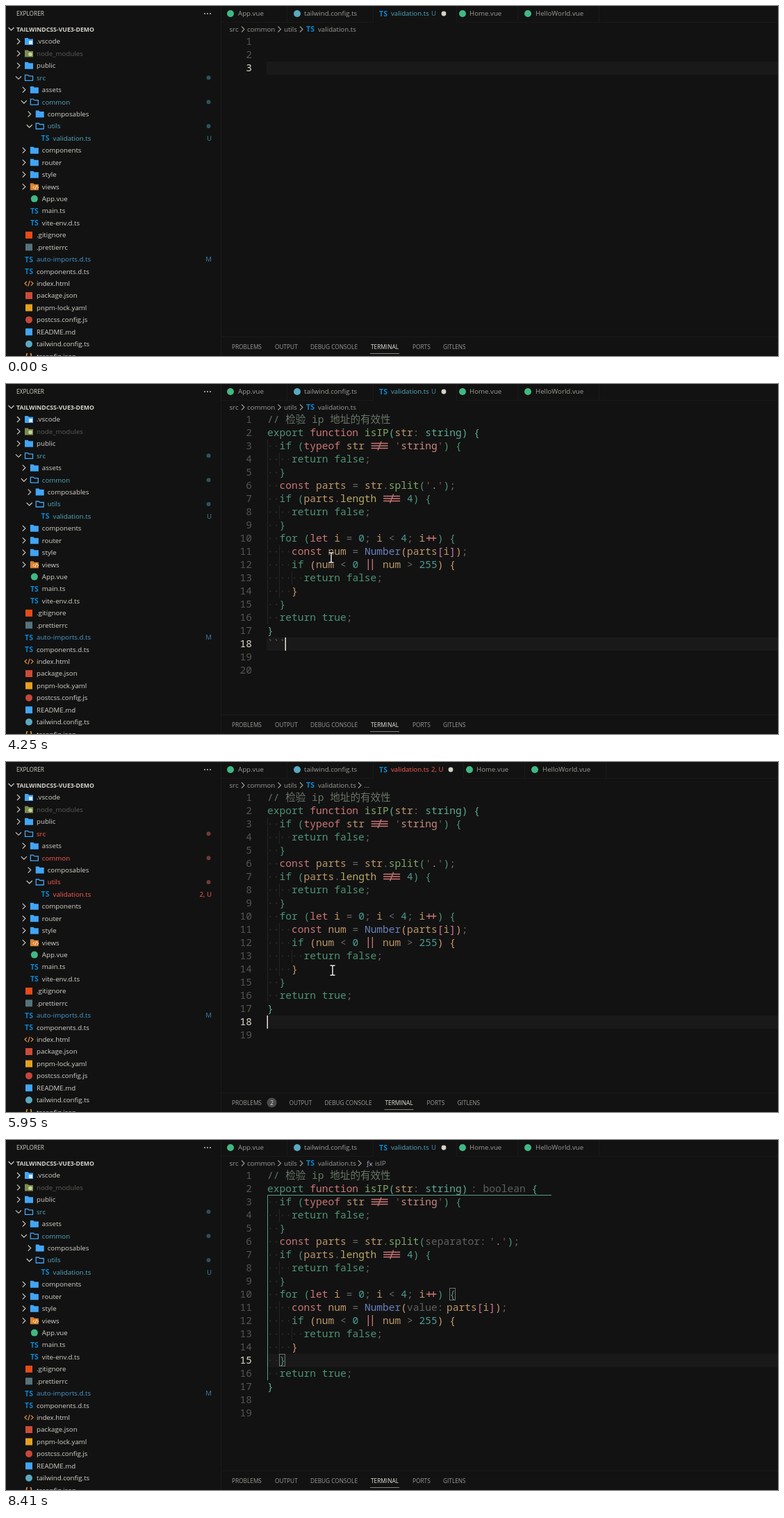
Recreate the animation shown at these times as an HTML page with a canvas. Size 1111x504 px, loop 8720 ms.

```html
<!DOCTYPE html>
<html lang="en">
<head>
<meta charset="utf-8">
<title>Code completion in an editor</title>
<style>
  html, body { margin: 0; width: 100%; height: 100%; overflow: hidden; background: #121212; }
  canvas { display: block; }
</style>
</head>
<body>
<canvas id="stage" width="1111" height="504"></canvas>
<script>
const ctx = document.getElementById('stage').getContext('2d');
const LOOP = 8720, CELL = 8.743, LEFT = 376, TOP = 42, LINE = 19;
const UI = '9.7px "Open Sans", sans-serif';
const SMALL = '8.3px "Open Sans", sans-serif';
const BOLD = 'bold 8.7px "Open Sans", sans-serif';
const BADGE = 'bold 10.5px "Open Sans", sans-serif';
const MONO = '14.57px "Noto Sans Mono", "Noto Sans CJK SC", "DejaVu Sans Mono", monospace';
const FG = '#d4d2ca', DIM = '#9b9b97', EDGE = '#1a1a1a';
const TEAL = '#52a9bd', BLUE = '#4798cc', RED = '#ff5a50', FOLDER = '#42a5f5', TS = '#0b86d0';
const VUE = 'o#41b883', WIND = 'o#5aa9c2';

const code = `// 检验 ip 地址的有效性
export function isIP(str: string) {
  if (typeof str !== 'string') {
    return false;
  }
  const parts = str.split('.');
  if (parts.length !== 4) {
    return false;
  }
  for (let i = 0; i < 4; i++) {
    const num = Number(parts[i]);
    if (num < 0 || num > 255) {
      return false;
    }
  }
  return true;
}
\`\`\``.split('\n');

const syntax = [
  [/\/\/.*/y, '#667566'],
  [/(?<=')[^']+(?=')/y, '#c98a7d'],
  [/'|`+/y, '#85594f'],
  [/(export|return|if|for|false|true)\b/y, '#4d9375'],
  [/(function|const|let|typeof)\b|!==|\|\||\+\+/y, '#cb7676'],
  [/(isIP|split)\b/y, '#80a665'],
  [/string\b/y, '#5da994'],
  [/Number\b/y, '#6b80bd'],
  [/length\b/y, '#b8a965'],
  [/\d+/y, '#4c9a91'],
  [/\w+/y, '#bd976a'],
  [/[()[\]{}]/y, 'bracket'],
  [/\S/y, '#6a6a6a'],
];
const brackets = ['#5daa94', '#4d9375', '#d4976c', '#d9739f'];

function tokenize(lines) {
  let depth = 0;
  return lines.map(line => {
    const tokens = [];
    for (let col = 0; col < line.length;) {
      if (line[col] === ' ') { col++; continue; }
      for (let [rule, color] of syntax) {
        rule.lastIndex = col;
        const match = rule.exec(line);
        if (!match) continue;
        const text = match[0];
        if (color === 'bracket') color = brackets['([{'.includes(text) ? depth++ : --depth];
        tokens.push({ text, col, color });
        col += text.length;
        break;
      }
    }
    return tokens;
  });
}
const tokens = tokenize(code);

// line: [column, label, gap before, gap after]
const hints = { 2: [33, ': boolean', 4.5, 0], 6: [26, 'separator:', 0, 4.5], 11: [23, 'value:', 0, 4.5] };

// depth, icon, name, state
const tree = [
  [0, '>', '.vscode'], [0, '>', 'node_modules', 'ignored'], [0, '>', 'public'], [0, 'v', 'src', 'U'],
  [1, '>', 'assets'], [1, 'v', 'common', 'U'], [2, '>', 'composables'], [2, 'v', 'utils', 'U'],
  [3, 'ts', 'validation.ts', 'U'], [1, '>', 'components'], [1, '>', 'router'], [1, '>', 'style'],
  [1, '>', 'views'], [1, VUE, 'App.vue'], [1, 'ts', 'main.ts'], [1, 'ts', 'vite-env.d.ts'],
  [0, '#e64a19', '.gitignore'], [0, '#56737a', '.prettierrc'], [0, 'ts', 'auto-imports.d.ts', 'M'],
  [0, 'ts', 'components.d.ts'], [0, 'html', 'index.html'], [0, '#cb4b37', 'package.json'],
  [0, '#e5a020', 'pnpm-lock.yaml'], [0, 'o#c4473a', 'postcss.config.js'], [0, '#42a5f5', 'README.md'],
  [0, WIND, 'tailwind.config.ts'], [0, 'json', 'tsconfig.json'],
];

// time, x, y
const mousePath = [
  [0, -50, -50], [210, 150, 470], [370, 190, 380], [530, 260, 250], [690, 430, 130], [850, 538, 85],
  [1160, 543, 62], [1285, 540, 58], [4250, 468, 250], [4520, 480, 275], [4700, 520, 330], [4880, 550, 370],
  [5060, 564, 388], [5950, 470, 300], [6290, 405, 203], [6440, 645, 222], [6600, 751, 295], [6740, 690, 330],
  [6890, 560, 318], [7040, 600, 318], [7370, 560, 330], [7520, 440, 360], [7670, 300, 395], [7820, 230, 430],
  [7970, 190, 460], [8120, 170, 480], [8270, 165, 496], [8410, -50, -50],
];
// time, line (0 hides it), column
const caretPath = [
  [0, 0], [1285, 1, 0], [1850, 0], [2270, 1, 0], [2420, 1, 20.2], [2950, 0], [3170, 2, 0], [3710, 0],
  [4060, 18, 3], [4700, 0], [5060, 18, 0], [5410, 0], [5610, 18, 0], [6290, 9, 3], [6440, 10, 31],
  [6600, 12, 31], [6740, 15, 3], [7330, 0], [7860, 15, 3], [8390, 0],
];
const activePath = [[0, 3], [1285, 1], [3170, 2], [4060, 18], [6290, 9], [6440, 10], [6600, 12], [6740, 15]];

const at = (path, t) => path.findLast(key => key[0] <= t).slice(1);
const colX = col => LEFT + col * CELL;
const lineY = line => TOP + (line - 1) * LINE;

function text(s, x, y, color = FG, font = UI, align = 'left') {
  ctx.font = font;
  ctx.fillStyle = color;
  ctx.textAlign = align;
  ctx.fillText(s, x, y);
}
function rect(x, y, w, h, color) {
  ctx.fillStyle = color;
  ctx.fillRect(x, y, w, h);
}
function circle(x, y, r, color) {
  ctx.fillStyle = color;
  ctx.beginPath();
  ctx.arc(x, y, r, 0, 7);
  ctx.fill();
}
function stroke(d, color, width = 1, x = 0, y = 0) {
  ctx.save();
  ctx.translate(x, y);
  ctx.strokeStyle = color;
  ctx.lineWidth = width;
  ctx.stroke(new Path2D(d));
  ctx.restore();
}
function chevron(x, y, open, color = FG) {
  stroke(open ? 'M-4-2L0 2L4-2' : 'M-2-4L2 0L-2 4', color, 1.1, x, y);
}

function icon(kind, x, y, name) {
  if (kind === 'ts') text('TS', x, y + 3.9, TS, BADGE, 'center');
  else if (kind === 'html') stroke('M-3-3L-6 0L-3 3M3-3L6 0L3 3M1.3-4L-1.3 4', '#e8953a', 1.2, x, y);
  else if (kind === 'json') text('{ }', x, y + 3.5, '#e8a33d', BADGE, 'center');
  else if (kind === 'v') stroke('M-5.5-4H-1.5L0-2.5H5.5V4H-5.5Z', FOLDER, 1.3, x, y);
  else if (kind === '>') {
    const color = { node_modules: '#7d8a4f', views: '#d9822f' }[name] || FOLDER;
    ctx.fillStyle = color;
    ctx.fill(new Path2D(`M${x - 6} ${y - 5}h4.5l1.5 1.5h6v8.5h-12z`));
    if (name === '.vscode') rect(x, y - 1, 5, 5, '#d7ecfb');
    if (name === 'node_modules') circle(x + 2, y + 1, 2.8, '#c5d59a');
    if (name === 'views') stroke('M0-1L-2 1L0 3M4-1L6 1L4 3M3-2L1 4', '#fff0dc', 1, x, y);
  } else if (kind[0] === 'o') circle(x, y, 5, kind.slice(1));
  else rect(x - 5, y - 5, 10, 10, kind);
}

function drawSidebar(t, errors, hover, mouseY) {
  text('EXPLORER', 15, 14, FG, SMALL);
  for (const x of [286, 290, 294]) circle(x, 11, 0.9, FG);
  chevron(7.5, 33, true);
  text('TAILWINDCSS-VUE3-DEMO', 15, 36.8, FG, BOLD);
  if (hover) {
    stroke('M-4-5H1L4-2V5H-4ZM1-5V-2H4', FG, 1, 234, 33);
    stroke('M-5-4H-1L0-3H5V4H-5Z', FG, 1, 252, 33);
    stroke('M3-3A4.5 4.5 0 1 0 4.5 1M3-6V-3H0', FG, 1, 270, 33);
    stroke('M-5-2H2V5H-5ZM-2-2V-5H5V2H2M-3 1.5H0', FG, 1, 288, 33);
  }
  const touched = errors ? RED : TEAL;
  tree.forEach(([depth, kind, name, state], i) => {
    const y = 51 + i * 17.43, shift = depth * 7.85;
    if (hover && Math.abs(mouseY - y) < 8.7) rect(0, y - 8.7, 309, 17.4, '#181818');
    if (hover) for (let d = 0; d < depth; d++) rect(18 + d * 7.85, y - 8.7, 1, 17.5, '#3a3a3a');
    if (kind === '>' || kind === 'v') chevron(18 + shift, y, kind === 'v');
    icon(kind, 33 + shift, y, name);
    const color = { U: touched, M: BLUE, ignored: '#5c5c57' }[state];
    text(name, 44 + shift, y + 3.4, color);
    if (kind === 'v') circle(291.5, y, 3, errors ? '#743a37' : t < 6290 ? '#2d545b' : '#304d5f');
    else if (state === 'M') text('M', 291.5, y + 3.2, '#3f80aa', UI, 'center');
    else if (state === 'U') text(errors ? '2, U' : 'U', 296, y + 3.2, errors ? RED : '#418fa1', UI, 'right');
  });
  rect(309, 0, 1, 504, EDGE);
}

function drawTabs(t, errors) {
  const shift = errors ? 10 : 0;
  const tab = (kind, iconX, name, x, edge, color = DIM) => {
    icon(kind, iconX, 11);
    text(name, x, 14.4, color);
    rect(edge, 0, 1, 23, EDGE);
  };
  tab(VUE, 323, 'App.vue', 334, 404);
  tab(WIND, 419, 'tailwind.config.ts', 429, 528);
  tab('ts', 543, 'validation.ts', 554, 648 + shift, errors ? RED : TEAL);
  text(errors ? '2, U' : 'U', 612, 14.4, errors ? RED : '#418fa1');
  circle(630 + shift, 11, 3.4, '#d5d2c6');
  tab(VUE, 657 + shift, 'Home.vue', 667 + shift, 736 + shift);
  tab(VUE, 751 + shift, 'HelloWorld.vue', 762 + shift, 853 + shift);
  rect(310, 23, 219, 1, EDGE);
  rect(648 + shift, 23, 463, 1, EDGE);

  [['src', 321.5], ['common', 347], ['utils', 400], ['validation.ts', 449]].forEach(([s, x]) => text(s, x, 37, DIM));
  for (const x of [341, 393.5, 425]) chevron(x, 33.5, false, DIM);
  icon('ts', 438, 33);
  if (t < 4700) return;
  chevron(509, 33.5, false, DIM);
  if (errors) text('…', 515.5, 37, DIM);
  else {
    text('ƒ', 518, 37, '#b9a5d0', UI);
    stroke('M0 0L4 5M4 0L0 5', '#b9a5d0', 1, 523, 32.5);
    text('isIP', 531, 37, DIM);
  }
}

function drawPanel(errors) {
  rect(310, 476, 801, 1, EDGE);
  const shift = errors ? 20.5 : 0;
  text('PROBLEMS', 325, 493.6, DIM, SMALL);
  if (errors) {
    circle(382.5, 490.5, 7, '#4b4b4b');
    text('2', 382.5, 493.5, '#ddd', SMALL, 'center');
  }
  [['OUTPUT', 387], ['DEBUG CONSOLE', 438], ['TERMINAL', 525], ['PORTS', 585], ['GITLENS', 629]].forEach(
    ([s, x]) => text(s, x + shift, 493.6, s === 'TERMINAL' ? '#e8e5da' : DIM, SMALL));
  rect(524 + shift, 500, 42, 1, '#86837b');
}

const ligatures = {
  '!==': 'M1-8.5H25M1-5H25M1-1.5H25M10.5 1.5L15.5-11.5',
  '||': 'M5.5-13V3M11.5-13V3',
  '++': 'M1.5-5H16M5.5-9V-1M12-9V-1',
};

function drawLine(line, ghost, withHints) {
  const top = lineY(line), base = top + 14, source = code[line - 1];
  const hint = withHints && hints[line];
  const indent = source.match(/^ */)[0].length;
  if (!ghost) {
    for (let col = 0; col < indent; col++) {
      if (col % 2 === 0) rect(Math.round(colX(col)), top, 1, LINE, '#252525');
      circle(colX(col + 0.5), top + 9.5, 0.9, '#343434');
    }
  }
  for (const { text: s, col, color } of tokens[line - 1]) {
    let x = colX(col);
    if (hint && col >= hint[0]) x += hint[1].length * CELL + hint[2] + hint[3];
    const ink = ghost ? '#5c5c5c' : color;
    if (ligatures[s]) stroke(ligatures[s], ink, 1.3, x, base);
    else text(s, x, base, ink, MONO);
  }
  if (hint) text(hint[1], colX(hint[0]) + hint[2], base, '#606060', MONO);
}

function drawErrors() {
  [[18, 7, "This expression is not callable.⏎ Type 'String' has no call signatures.", 3],
   [19, 4, 'Unterminated template literal.', 1]].forEach(([line, col, message, width]) => {
    const y = lineY(line);
    rect(LEFT, y, 735, LINE, '#2d1718');
    // Each word sits on the character grid, whatever the width of a fallback glyph.
    for (const { 0: word, index } of message.matchAll(/⏎|[^\s⏎]+/g)) {
      text(word, colX(col + index), y + 14, '#ff6464', MONO);
    }
    stroke('M0 0' + 'q2-3 4 0t4 0'.repeat(width), '#d9534f', 1, LEFT + 1, y + 18);
  });
}

function drawEditor(t) {
  const [active] = at(activePath, t);
  const ghost = t >= 3340 && t < 4060;
  const selecting = t >= 6440 && t < 6890;
  const withHints = t >= 7040;
  const total = t < 3170 ? 3 : t < 4060 ? 4 : t < 5950 ? 20 : 19;

  if (selecting) {
    for (let line = 9; line <= active; line++) {
      const from = line === 9 ? 3 : 0;
      const to = code[line - 1].length + (line < active ? 1 : 0);
      rect(colX(from), lineY(line), (to - from) * CELL, LINE, '#292929');
    }
  } else rect(LEFT - 1, lineY(active), 736, LINE, '#191919');
  if (t >= 4700 && t < 5950) drawErrors();

  for (let n = 1; n <= total; n++) {
    const row = ghost && n > 2 ? n + 16 : n;
    text(n, 354, lineY(row) + 14, n === active ? '#dedacb' : '#545450', MONO, 'right');
  }

  const shown = t < 2420 ? 0 : t < 3340 ? 1 : t < 5950 ? 18 : 17;
  if (t >= 6440) {
    for (const [line, col] of [[10, 30], [15, 2]]) {
      ctx.strokeStyle = '#707070';
      ctx.strokeRect(Math.round(colX(col)) + 0.5, lineY(line) + 0.5, 8, LINE - 2);
    }
  }
  for (let line = 1; line <= shown; line++) drawLine(line, ghost && line > 1, withHints);
  if (t >= 6600 && t < 6740) stroke('M638 269.5H410.5V289', '#c08a63');
  if (t >= 6890) stroke('M785 79.5H376.5V346', '#589a88');

  const [line, col] = at(caretPath, t);
  if (line) rect(Math.round(colX(col)) - 0.5, lineY(line), 1.5, LINE, '#e4e1d6');
}

function drawMouse(t, x, y) {
  if (x < 309) {
    const arrow = 'M0 0V13L3 10L5 15L7 14L5 9.5H9Z';
    stroke(arrow, '#000', 2, x, y);
    ctx.save();
    ctx.translate(x, y);
    ctx.fillStyle = '#fff';
    ctx.fill(new Path2D(arrow));
    ctx.restore();
    return;
  }
  const beam = 'M-3.5-7H-1L0-6L1-7H3.5M0-6V6M-3.5 7H-1L0 6L1 7H3.5';
  stroke(beam, '#000', 3, x, y);
  stroke(beam, '#f2f2f2', 1.5, x, y);
  if (t >= 6600 && t < 6740) stroke('M-7 0A7 7 0 1 1 7 0A7 7 0 1 1-7 0', '#e0e0e0', 1.2, x, y);
}

function draw(now) {
  const t = now % LOOP;
  const errors = t >= 4700 && t < 6290;
  const [mouseX, mouseY] = at(mousePath, t);
  rect(0, 0, 1111, 504, '#121212');
  ctx.lineWidth = 1;
  drawSidebar(t, errors, mouseX > 0 && mouseX < 309, mouseY);
  drawTabs(t, errors);
  drawEditor(t);
  drawPanel(errors);
  drawMouse(t, mouseX, mouseY);
}

const start = performance.now();
(function frame() {
  draw(performance.now() - start);
  requestAnimationFrame(frame);
})();
</script>
</body>
</html>
```
